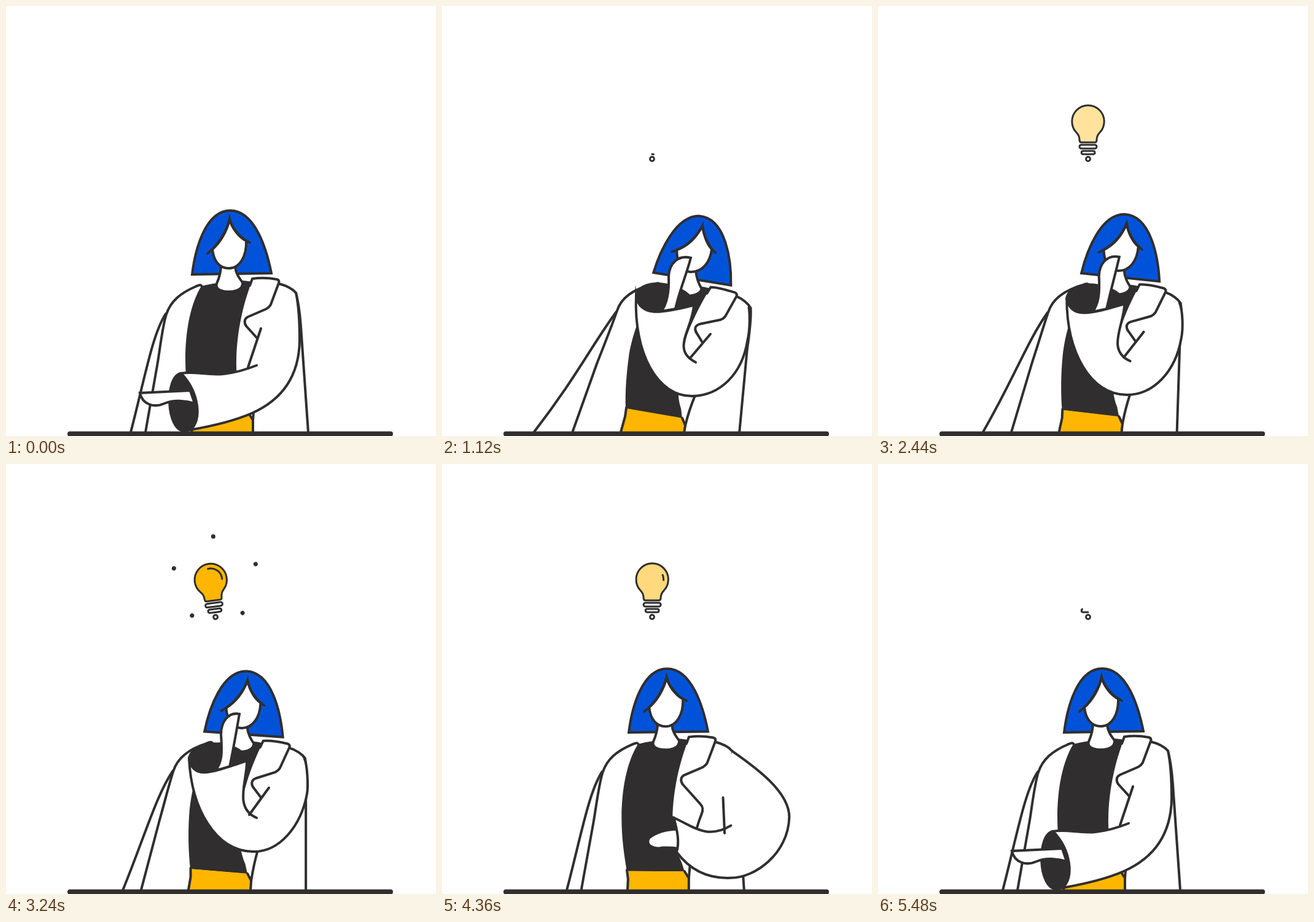
Recreate the animation shown at these times as an HTML page with a canvas. Size 700 px wide and 700 px high, loop 5.52 s.

```html
<!DOCTYPE html>
<html lang="en">
<head>
<meta charset="utf-8">
<title>Bright idea</title>
<style>
html, body { margin: 0; width: 100%; height: 100%; overflow: hidden; background: #fff; }
canvas { display: block; width: 100vw; height: 100vh; }
</style>
</head>
<body>
<canvas id="stage" width="700" height="700"></canvas>
<script>
const LOOP = 5520;
const INK = '#302e2f', BLUE = '#0053d8', GOLD = '#ffb600', WHITE = '#fff';
const ctx = document.getElementById('stage').getContext('2d');

// ---- helpers ----
const NUM = /-?\d+(\.\d+)?/g;
const lerp = (a, b, k) => a + (b - a) * k;
const smooth = k => k * k * (3 - 2 * k);
const span = (t, a, b) => Math.min(1, Math.max(0, (t - a) / (b - a)));

// Blend two path strings of the same structure
function mix(a, b, k) {
  const to = b.match(NUM);
  let i = 0;
  return a.replace(NUM, n => lerp(+n, +to[i++], k).toFixed(2));
}

// Keys are [time, value, linear?]; the flag belongs to the segment it starts
function track(keys, t) {
  if (t <= keys[0][0]) return keys[0][1];
  for (let i = 1; i < keys.length; i++) {
    const [t0, a, linear] = keys[i - 1], [t1, b] = keys[i];
    if (t > t1) continue;
    const p = span(t, t0, t1), k = linear ? p : smooth(p);
    return typeof a === 'string' ? mix(a, b, k) : lerp(a, b, k);
  }
  return keys[keys.length - 1][1];
}

function mapXY(path, fx, fy) {
  let i = 0;
  return path.replace(NUM, n => (i++ % 2 ? fy(+n) : fx(+n)).toFixed(2));
}

function draw(d, fill, width = 4) {
  const p = new Path2D(d);
  if (fill) { ctx.fillStyle = fill; ctx.fill(p); }
  if (width) { ctx.lineWidth = width; ctx.strokeStyle = INK; ctx.stroke(p); }
}

function pathLength(d) {
  const el = document.createElementNS('http://www.w3.org/2000/svg', 'path');
  el.setAttribute('d', d);
  return el.getTotalLength();
}

// ---- body: upright and leaning outlines ----
const body = {
  panel: [
    'M319 457 C317 452 313 455 308 457 C285 467 268 480 261 502 C255 520 251 555 247 580 L227 694',
    'M356 454 C354 450 350 451 345 453 C318 459 293 471 285 497 C278 517 265 550 253 580 L212 694'],
  shirt: [
    'M318 456 C300 485 292 530 292 575 C292 610 297 640 301 663 L395 663 L390 648 C381 628 374 610 375 575 C376 530 386 485 400 449 C395 448 390 447 385 447 L343 451 C335 452 326 454 318 456Z',
    'M356 454 C325 490 312 530 305 565 C300 600 298 630 299 655 L391 672 L389 655 C384 640 384 625 386 590 C390 550 410 505 437 460 C430 458 425 457 421 457 L380 454 C372 453 364 453 356 454Z'],
  trousers: [
    'M302 663 L395 663 L402 674 L402 700 L302 700 L303 676Z',
    'M301 655 L391 671 L396 683 L391 700 L289 700 L298 668Z'],
  trouserSides: [
    'M301 661 L303 676 L302 700 M395 663 L402 674 L402 700',
    'M300 654 L298 668 L289 700 M391 671 L396 683 L393 700'],
  coat: [
    'M444 452 C456 455 467 461 472 467 C478 490 479 510 480 522 L492 694',
    'M480 473 C490 477 499 485 503 492 C504 510 500 540 497 560 L484 694'],
  edge: [
    'M402 674 C404 645 408 605 422 570 C425 563 425 558 420 553 L391 521',
    'M396 683 C404 648 420 615 437 582 C440 575 440 571 436 567 L414 531'],
  lapel: [
    'M397 455 L401 444 C415 442 430 443 441 445 C444 446 445 448 444 451 L431 486 C429 490 427 491 424 493 L394 506 C388 509 387 515 391 521',
    'M432 468 L438 458 C450 458 465 463 478 467 C481 469 481 471 480 473 L462 505 C459 509 457 510 454 511 L420 518 C413 520 411 525 414 531'],
  hair: [
    'M303 437 L432 435 C424 395 405 333 365 333 C325 333 308 395 303 437Z',
    'M345 434 L471 455 C472 417 464 345 419 342 C382 342 356 398 345 434Z'],
  neck: [
    'M350 422 C350 435 346 445 343 452 C340 462 352 465 364 465 C376 465 386 460 385 450 C380 443 374 436 373 424',
    'M393 428 C389 440 385 446 381 452 C376 464 388 471 400 472 C411 472 423 468 423 460 C419 453 415 445 414 432'],
  face: [
    'M364 347 C360 366 349 385 336 396 C338 416 348 427 363 427 C380 427 392 408 391 382 C379 377 367 360 364 347Z',
    'M425 358 C415 377 401 391 383 397 C383 419 391 433 406 433 C424 433 437 419 440 396 C433 389 427 374 425 358Z'],
  fringe: [
    'M328 403 C344 391 359 368 364 347 C368 362 382 379 397 385',
    'M375 400 C398 393 415 377 425 358 C427 374 434 391 446 402']
};

const lean = [[0, 0], [580, 1], [1050, 1, 1], [3240, .48, 1], [3900, .37], [4450, 0]];
const sweep = [[0, 0], [1380, 1], [1680, .86, 1], [3240, .22, 1], [3880, 0]];

// ---- arm poses: sleeve | cuff opening | hand | crease ----
const rest = 'C477 490 478 520 478 545 C477 600 452 640 400 663 C370 676 335 684 300 690 C320 675 314 628 285 598 C320 592 340 612 408 585'
  + '|M300 690 C320 675 314 628 285 598 C258 602 260 692 291 692Z'
  + '|M300 626 C275 627 240 629 218 630 C222 648 240 655 258 647 C275 640 295 643 307 647Z'
  + '|415 525 394 588';
const raise = 'C520 520 541 555 541 592 C541 645 515 677 473 677 C420 677 380 640 346 599 C375 603 395 575 417 542 C440 570 420 612 480 616'
  + '|M346 599 C375 603 395 575 417 542 C400 525 352 588 346 599Z'
  + '|M397 566 C388 550 375 520 365 490 C352 494 350 512 360 530 C372 548 380 560 382 583Z'
  + '|472 564 468 615';
const think = 'C501 500 502 525 497 546 C488 600 452 634 408 635 C350 636 312 565 316 472 C322 505 352 502 410 487 C408 525 372 560 413 580'
  + '|M316 472 C322 505 352 502 410 487 C408 455 325 435 316 472Z'
  + '|M380 493 C386 465 397 440 405 410 C385 405 370 418 369 440 C370 465 366 485 357 497Z'
  + '|437 534 404 573';
const ponder = 'C491 490 492 525 490 537 C480 590 445 632 402 631 C340 630 302 560 298 480 C305 515 335 502 392 483 C393 515 370 560 408 576'
  + '|M298 480 C305 515 335 502 392 483 C390 455 310 440 298 478Z'
  + '|M364 493 C370 465 375 435 380 407 C362 403 350 420 350 440 C352 470 352 485 341 499Z'
  + '|428 527 396 571';
const swing = 'C515 495 577 535 577 580 C577 640 520 680 480 680 C440 682 415 670 395 655 C400 630 390 610 375 590 C410 600 440 620 480 590'
  + '|M395 655 C400 630 390 610 375 590 C355 600 365 650 395 655Z'
  + '|M385 610 C365 615 345 625 330 640 C325 655 345 660 360 653 C372 648 385 645 396 648Z'
  + '|462 545 470 605';
const hip = 'C497 495 537 550 537 597 C537 640 505 672 485 693 C465 712 435 716 415 697 C405 680 390 668 372 658 C400 637 430 648 476 598'
  + '|M415 697 C405 680 390 668 372 658 C350 670 362 700 415 697Z'
  + '|M397 681 C385 686 374 690 362 695 C360 705 380 715 390 712 C400 710 410 705 414 697Z'
  + '|451 544 465 608';
const settle = mapXY(ponder, x => x + 1, y => y + 4);
const reach = mapXY(rest, x => 400 + (x - 400) * 1.08, y => y);

const arm = [[0, rest], [600, raise], [1110, think], [1680, think, 1], [3240, ponder, 1],
  [3900, settle], [4500, swing], [4760, hip], [5030, reach], [5300, rest]];

function drawBack(l, k) {
  draw(`M${260 + 24 * l} ${501 - 3 * l} C${238 + 22 * l - 18 * k} ${535 + 20 * k} `
    + `${226 + 8 * l - 18 * k} 606 ${203 - 59 * k} 694`);
}

function drawArm(t, l) {
  const [sleeve, cuff, hand, crease] = track(arm, t).split('|');
  const [ax, ay, bx, by] = crease.match(NUM);
  const outline = `M${lerp(472, 500, l)} ${lerp(467, 491, l)} ${sleeve}`;
  draw(cuff, INK);
  draw(hand, WHITE);
  draw(`${outline} L${bx} ${by} L${ax} ${ay}Z`, WHITE, 0);
  draw(outline);
  draw(`M${ax} ${ay} L${bx} ${by}`);
}

function drawWoman(t) {
  const l = track(lean, t);
  const part = (name, fill, width) => draw(mix(...body[name], l), fill, width);
  ctx.save();
  ctx.beginPath();
  ctx.rect(0, 0, 700, 694);
  ctx.clip();
  drawBack(l, track(sweep, t));
  part('panel');
  part('shirt', INK, 0);
  part('trousers', GOLD, 0);
  part('trouserSides');
  part('coat');
  part('edge');
  part('lapel', WHITE);
  part('hair', BLUE);
  part('neck', WHITE);
  part('face', WHITE);
  part('fringe');
  drawArm(t, l);
  ctx.restore();
}

// ---- bulb ----
const bulb = {
  glass: 'M342 222 L331 222 Q328 222 328 218 C328 213 327 210 323 206 A26.2 26.2 0 1 1 361 206 C357 210 356 213 356 218 Q356 222 353 222Z',
  ring: 'M342 232 H353 A3 3 0 0 0 353 226 H331 A3 3 0 0 0 331 232Z',
  tip: 'M342 241.3 H350.8 A2.7 2.7 0 0 0 350.8 236 H333.4 A2.7 2.7 0 0 0 333.4 241.3Z'
};
const lengths = {};
for (const name in bulb) lengths[name] = pathLength(bulb[name]);

const tilt = [[2780, 0], [3040, -11], [3820, 11], [3900, 11], [4400, 0]];

function trace(name, from, to) {
  if (to <= from) return;
  const len = lengths[name];
  if (to - from < 1) {
    ctx.setLineDash([(to - from) * len, len * 2]);
    ctx.lineDashOffset = -from * len;
  }
  draw(bulb[name], null, 3);
  ctx.setLineDash([]);
}

function drawBulb(t) {
  if (t < 480) return;
  ctx.save();
  ctx.translate(342, 256);
  ctx.rotate(track(tilt, t) * Math.PI / 180);
  ctx.translate(-342, -256);

  ctx.globalAlpha = span(t, 2280, 2700) * (1 - span(t, 4250, 4480));
  draw(bulb.glass, GOLD, 0);
  ctx.globalAlpha = 1;

  trace('glass', span(t, 4560, 5060), span(t, 1740, 2240));
  trace('ring', span(t, 5000, 5300), span(t, 1420, 2050));
  trace('tip', span(t, 5180, 5620), span(t, 1090, 1740));

  const a = span(t, 4200, 4420), b = span(t, 2450, 2780);
  ctx.lineWidth = 3;
  ctx.strokeStyle = INK;
  if (b > a) {
    ctx.beginPath();
    ctx.arc(342, 188, 18.5, -1.7 + 1.75 * a, -1.7 + 1.75 * b);
    ctx.stroke();
  }
  ctx.beginPath();
  ctx.arc(342, lerp(262, 249, smooth(span(t, 480, 1020))), 3.4 * span(t, 460, 580), 0, 7);
  ctx.stroke();
  ctx.restore();
}

// ---- rays: two rings of five ----
const rings = [
  { turn: -93, end: 4080,
    inner: [[3000, 52], [3220, 70], [3880, 77, 1], [4080, 80]],
    outer: [[3000, 52], [3240, 70], [3620, 126], [3880, 100, 1], [4080, 82]],
    width: [[3000, 0], [3160, 7], [3300, 7], [3880, 4.5, 1], [4080, 0]] },
  { turn: -57, end: 4260,
    inner: [[3600, 100], [3880, 114], [4260, 126]],
    outer: [[3600, 100], [3880, 123], [4040, 129], [4260, 129]],
    width: [[3600, 0], [3760, 6], [3960, 6], [4260, 0]] }
];

function drawRays(t) {
  for (const ring of rings) {
    if (t <= ring.outer[0][0] || t >= ring.end) continue;
    const r0 = track(ring.inner, t), r1 = Math.max(r0 + .01, track(ring.outer, t));
    ctx.lineWidth = Math.max(.1, track(ring.width, t));
    ctx.strokeStyle = INK;
    ctx.beginPath();
    for (let i = 0; i < 5; i++) {
      const a = (ring.turn + 72 * i) * Math.PI / 180, c = Math.cos(a), s = Math.sin(a);
      ctx.moveTo(341 + r0 * c, 188 + r0 * s);
      ctx.lineTo(341 + r1 * c, 188 + r1 * s);
    }
    ctx.stroke();
  }
}

function frame(now) {
  const t = now % LOOP;
  ctx.fillStyle = WHITE;
  ctx.fillRect(0, 0, 700, 700);
  ctx.lineCap = 'round';
  ctx.lineJoin = 'miter';
  drawRays(t);
  drawBulb(t);
  drawWoman(t);
  draw('M104 696.6 L626 696.6', null, 8);
}

const start = performance.now();
function tick() {
  frame(performance.now() - start);
  requestAnimationFrame(tick);
}
tick();
</script>
</body>
</html>
```
